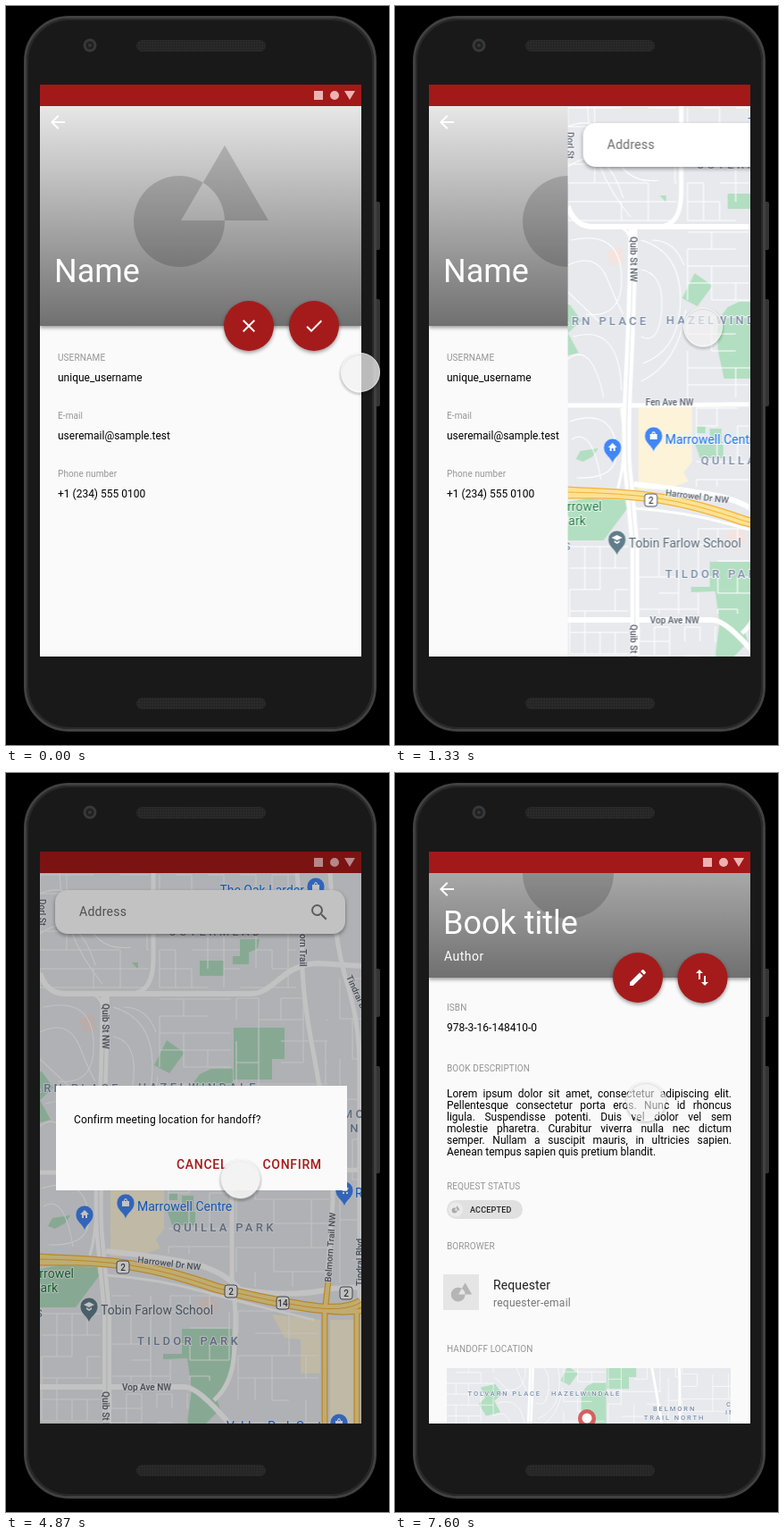
These frames come from a looping animation (429x827 px, 8 s). An HTML page:

```html
<!DOCTYPE html>
<html lang="en">
<head>
<meta charset="utf-8">
<title>Handoff prototype</title>
<style>
html, body { margin: 0; width: 100%; height: 100%; overflow: hidden; background: #000; }
svg { display: block; width: 100%; height: 100%; font: 12px Roboto, sans-serif; }
.label { font-size: 10px; letter-spacing: .1px; fill: #959595; }
.title { font-size: 36px; fill: #fff; }
.lift { filter: drop-shadow(0 2px 2px rgba(0, 0, 0, .4)); }
.action { font-size: 14px; font-weight: 500; letter-spacing: .7px; fill: #a51b1b; }
.district { font-size: 13px; font-weight: 500; letter-spacing: 3.3px; fill: #7b8da8; }
.street { font-size: 10px; font-weight: 500; fill: #5f6672; }
.place { font-size: 14px; }
.district, .street, .place { paint-order: stroke; stroke: #f4f5f7; stroke-width: 2px; stroke-linejoin: round; }
.prose { font: 12px/13px Roboto, sans-serif; color: #000; white-space: nowrap; }
.prose div { text-align-last: justify; white-space: normal; }
</style>
</head>
<body>
<svg viewBox="0 0 429 827" preserveAspectRatio="none">
  <defs>
    <clipPath id="screen"><path d="M38 88h360v640H38z"/></clipPath>
    <clipPath id="card"><path d="M58 795h318v190H58z"/></clipPath>
    <linearGradient id="fade" x2="0" y2="1"><stop stop-color="#e7e7e7"/><stop offset="1" stop-color="#707070"/></linearGradient>
    <radialGradient id="halo">
      <stop offset=".8" stop-opacity="0"/><stop offset=".86" stop-opacity=".24"/><stop offset="1" stop-opacity="0"/>
    </radialGradient>
    <pattern id="mesh" width="3" height="3" patternUnits="userSpaceOnUse">
      <path d="M0 0h3v3H0z" fill="#2a2a2a"/><path d="M0 0h1.5v1.5H0z" fill="#1f1f1f"/>
    </pattern>
    <path id="shapes" fill-rule="evenodd" d="M143 241a51 51 0 1 0 102 0a51 51 0 1 0-102 0zM245 156l49 84h-98z"/>
    <path id="back" fill="#fff" transform="translate(46 118)" d="M20 11H7.83l5.59-5.59L12 4l-8 8 8 8 1.41-1.41L7.83 13H20z"/>
    <g id="bar">
      <path d="M38 88h360v24H38z" fill="#a31919"/>
      <path d="M345 95h10v10h-10zM379 95h12l-6 10zM363 100a5 5 0 1 0 10 0a5 5 0 1 0-10 0z" fill="#edb3b3"/>
    </g>
    <g id="header">
      <path class="lift" d="M38 112h360v246H38z" fill="url(#fade)"/>
      <use href="#shapes" fill-opacity=".17"/>
    </g>
    <circle id="fab" class="lift" r="28" fill="#a51b1b"/>
    <g id="tiles"></g>
  </defs>

  <g id="phone">
    <path d="M412 219h5a2 2 0 0 1 2 2v50a2 2 0 0 1-2 2h-5zM412 328h5a2 2 0 0 1 2 2v116a2 2 0 0 1-2 2h-5z" fill="#343434"/>
    <rect x="21.5" y="12.5" width="392" height="798" rx="49" fill="#191919" stroke="#414141" stroke-width="3"/>
    <rect x="24" y="15" width="387" height="793" rx="47" fill="none" stroke="#292929" stroke-width="2"/>
    <circle cx="94" cy="44" r="7.5" fill="#383838"/>
    <circle cx="94" cy="44" r="4.5" fill="#1f2022"/>
    <circle cx="94" cy="44" r="2" fill="#32383b"/>
    <rect x="146" y="38" width="145" height="13" rx="6.5" fill="url(#mesh)"/>
    <rect x="146" y="774" width="145" height="13" rx="6.5" fill="url(#mesh)"/>
  </g>

  <g clip-path="url(#screen)">
    <g id="profile">
      <path d="M38 88h360v640H38z" fill="#fafafa"/>
      <use href="#header"/><use href="#bar"/><use href="#back"/>
      <text class="title" x="54" y="309">Name</text>
      <use href="#fab" x="272" y="358"/><use href="#fab" x="345" y="358"/>
      <path fill="#fff" transform="translate(260 346)" d="M19 6.41L17.59 5 12 10.59 6.41 5 5 6.41 10.59 12 5 17.59 6.41 19 12 13.41 17.59 19 19 17.59 13.41 12z"/>
      <path fill="#fff" transform="translate(333 346)" d="M9 16.17L4.83 12l-1.42 1.41L9 19 21 7l-1.41-1.41z"/>
      <text class="label" x="58" y="397">USERNAME</text><text x="58" y="420">unique_username</text>
      <text class="label" x="58" y="462">E-mail</text><text x="58" y="485">useremail@sample.test</text>
      <text class="label" x="58" y="527">Phone number</text><text x="58" y="550">+1 (234) 555 0100</text>
    </g>

    <g id="map">
      <g clip-path="url(#screen)">
        <use href="#tiles"/>
        <g id="places"></g>
        <use href="#bar"/>
        <rect class="lift" x="55" y="131" width="325" height="49" rx="14" fill="#fff"/>
        <text x="82" y="160" font-size="14" letter-spacing=".25" fill="#6a6a6a">Address</text>
        <path fill="#7a7a7a" transform="translate(339 144)" d="M15.5 14h-.79l-.28-.27A6.47 6.47 0 0 0 16 9.500 6.500 6.500 0 1 0 9.500 16c1.610 0 3.090-.59 4.230-1.570l.27.28v.79l5 4.990L20.490 19zM9.500 14a4.500 4.500 0 1 1 0-9 4.500 4.500 0 0 1 0 9z"/>
      </g>
    </g>

    <g id="dialog">
      <path d="M38 88h360v640H38z" fill-opacity=".24"/>
      <path d="M56 350h326v117H56z" fill="#fafafa"/>
      <text x="76" y="392" letter-spacing=".16">Confirm meeting location for handoff?</text>
      <text class="action" x="191" y="443">CANCEL</text><text class="action" x="287.500" y="443">CONFIRM</text>
    </g>

    <g id="book">
      <path d="M38 88h360v640H38z" fill="#fafafa"/>
      <g id="page">
        <use href="#header"/>
        <text class="title" x="54" y="309">Book title</text>
        <text x="55" y="339" font-size="14" letter-spacing=".5" fill="#fff">Author</text>
        <use href="#fab" x="272" y="358"/><use href="#fab" x="344.500" y="358.500"/>
        <path fill="#fff" transform="translate(260 346)" d="M3 17.250V21h3.750L17.810 9.940l-3.750-3.750zM20.710 7.040c.39-.39.39-1.020 0-1.410l-2.340-2.340c-.39-.39-1.020-.39-1.410 0l-1.830 1.830 3.750 3.750z"/>
        <path fill="#fff" transform="translate(332 346)" d="M16 17.010V10h-2v7.010h-3L15 21l4-3.990zM9 3L5 6.990h3V14h2V6.990h3z"/>
        <text class="label" x="58" y="395">ISBN</text><text x="58" y="418">978-3-16-148410-0</text>
        <text class="label" x="58" y="463">BOOK DESCRIPTION</text>
        <foreignObject x="58" y="482" width="319" height="84">
          <div class="prose" xmlns="http://www.w3.org/1999/xhtml">
            <div>Lorem ipsum dolor sit amet, consectetur adipiscing elit.</div>
            <div>Pellentesque consectetur porta eros. Nunc id rhoncus</div>
            <div>ligula. Suspendisse potenti. Duis vel dolor vel sem</div>
            <div>molestie pharetra. Curabitur viverra nulla nec dictum</div>
            <div>semper. Nullam a suscipit mauris, in ultricies sapien.</div>
            Aenean tempus sapien quis pretium blandit.
          </div>
        </foreignObject>
        <text class="label" x="58" y="595">REQUEST STATUS</text>
        <rect x="58" y="607" width="85" height="21" rx="10.500" fill="#e0e0e0"/>
        <circle cx="68" cy="617.500" r="8" fill="#ebebeb"/>
        <use href="#shapes" fill="#aaa" transform="translate(55 604) scale(.06)"/>
        <text x="84" y="620.500" font-size="9" font-weight="500" letter-spacing=".2" fill="#222">ACCEPTED</text>
        <text class="label" x="58" y="662">BORROWER</text>
        <path d="M54 690h40v40H54z" fill="#e5e5e5"/>
        <use href="#shapes" fill="#b5b5b5" transform="translate(40.600 675.300) scale(.155)"/>
        <text x="110" y="707" font-size="14" letter-spacing=".1" fill="#212121">Requester</text>
        <text x="110" y="726" letter-spacing=".25" fill="#757575">requester-email</text>
        <text class="label" x="58" y="777">HANDOFF LOCATION</text>
        <g clip-path="url(#card)">
          <use href="#tiles" transform="translate(89.200 619.400) scale(.58)"/>
          <path d="M215 873c-2-8-10-13-10-22a10 10 0 1 1 20 0c0 9-8 14-10 22z" fill="#d65f5f"/>
          <circle cx="215" cy="851" r="5.500" fill="#fff"/>
        </g>
      </g>
      <use href="#bar"/><use href="#back"/>
    </g>
  </g>

  <g id="touch">
    <circle cy="2" r="25" fill="url(#halo)"/>
    <circle r="21.500" fill="#f2f2f2" stroke="#fff" stroke-opacity=".8"/>
  </g>
</svg>

<script>
const $ = id => document.getElementById(id);

// Map geometry
let seed = 7;
const random = () => (seed = seed * 16807 % 2147483647) / 2147483647;

// Street grid with some blocks left out
function grid([x0, y0, x1, y1, dx, dy]) {
  let d = '';
  for (let x = x0; x <= x1; x += dx)
    for (let y = y0; y < y1; y += dy)
      if (random() < .6) d += `M${x} ${y}V${Math.min(y + dy, y1)}`;
  for (let y = y0; y <= y1; y += dy)
    for (let x = x0; x < x1; x += dx)
      if (random() < .72) d += `M${x} ${y}H${Math.min(x + dx, x1)}`;
  return d;
}
const area = (fill, d) => `<path d="${d}" fill="${fill}"/>`;
const line = (color, width, d) => `<path d="${d}" fill="none" stroke="${color}" stroke-width="${width}" stroke-linejoin="round"/>`;
const text = (cls, x, y, words, extra = '') => `<text class="${cls}" x="${x}" y="${y}" ${extra}>${words}</text>`;
const street = (x, y, turn, words) => text('street', 0, 0, words, `transform="translate(${x} ${y}) rotate(${turn})"`);

const blocks = [
  [38, 114, 160, 240, 30, 21], [172, 114, 325, 240, 18, 21], [172, 253, 252, 438, 27, 19],
  [258, 252, 360, 440, 25, 24], [182, 450, 250, 538, 23, 20], [258, 450, 362, 575, 21, 27],
  [118, 585, 250, 680, 22, 18], [40, 605, 106, 725, 17, 24], [118, 695, 204, 728, 17, 16],
  [260, 602, 350, 728, 19, 25], [374, 230, 398, 570, 14, 45]
];
const sides = [[-60, 290, 36, 440, 24, 21], [400, 290, 500, 440, 30, 24]];
const curves = `M38 135Q75 120 88 160T140 195M38 180Q80 150 100 215M60 112Q62 180 108 236
  M42 262Q95 250 98 300T58 345M38 290Q70 275 82 305T100 345M38 320L75 355M44 370Q96 355 98 430M38 395Q65 375 78 438
  M120 262Q165 275 164 330T122 400M120 295Q146 300 143 340T120 370M120 420Q162 400 170 340M132 262Q158 262 168 290
  M40 465Q85 450 92 490T48 528M42 485Q65 470 75 530`;
const highway = 'M38 544Q100 545 140 551T235 576Q290 590 335 597T398 592';
const ramp = 'M38 541L118 548M38 548H112M335 596Q360 606 398 602M357 728V605L361 568M393 602V728';

$('tiles').innerHTML =
  area('#e7e9ed', 'M-80 88H520V760H-80z') +
  area('#fcf3d9', 'M117 448H177V510L168 522 173 532 148 541H117zM298 606L352 612V672H330V634L312 632zM363 612H390V728H363z') +
  area('#f5e3df', 'M82 275L98 270 101 287 86 291zM216 590L231 585 238 597 226 610 217 605z') +
  area('#b2dfc1', `M255 285H312V320H298V343H255zM180 299L200 313 183 336 166 327zM217 337L230 331H254V417H213L206 385V352z
    M217 210H244V227H217zM262 186H284L282 196 272 201V214H254V205H262zM141 212H148V220zM182 470H192V478H182zM197 473H210V490H197zM180 488H212V506H186z
    M38 555L60 551 102 553 104 563 78 598H38zM47 507L52 498 72 495 66 504 55 510z
    M197 622H253V672L236 700 240 712 224 728H203L208 690 203 655 176 656V650H197zM12 340L40 334 53 352 38 366 50 388 22 395 8 372 20 360z`) +
  line('#fff', 1.1, blocks.concat(sides).map(grid).join('') + curves) +
  line('#fff', 5, `M-80 447H115L520 443M165 112V205Q166 246 140 247M253 444V575Q260 600 255 655 252 685 233 702
    M326 112Q332 180 332 213T342 300 366 440V480L358 590M363 112Q368 190 382 235T396 330V600`) +
  line('#fff', 6, `M38 224Q45 246 65 247H275C300 247 310 213 350 213L398 216
    M38 687H200Q215 687 250 728M112 535Q160 540 200 547T262 578Q320 588 365 577L398 575`) +
  line('#fff', 3, 'M112 562Q170 566 220 580T345 612M94 540Q105 500 98 450M95 247Q108 250 110 270') +
  line('#fff', 10, 'M111 245Q110 330 106 410T105 520Q110 570 113 605V728') +
  line('#e3e5e9', 1, 'M111 258Q110 330 106 410T105 520Q110 570 113 605V728') +
  line('#f3b237', 11.5, highway) + line('#f3b237', 7, ramp) +
  line('#fde293', 9, highway) + line('#fde293', 4.5, ramp) + line('#f3b237', 1, highway) +
  text('district', 129, 357, 'TOLVARN PLACE', 'text-anchor="end"') +
  text('district', 148, 356, 'HAZELWINDALE') + text('district', 182, 182, 'OSTERMEAD') +
  text('district', 187, 513, 'QUILLA PARK') + text('district', 147, 640, 'TILDOR PARK') +
  text('district', 386, 386, 'BELMORN', 'text-anchor="middle"') +
  text('district', 386, 402, 'TRAIL NORTH', 'text-anchor="middle"') +
  text('district', 486, 377, 'CORIN') + text('district', 484, 393, 'INDUSTRY') +
  text('district', 33, 609, 'S');

// Pins, shields and street names
const icons = {
  home: 'M-5 0L0-5 5 0H3V4H1V1H-1V4H-3V0z',
  bag: 'M-4-2H-2V-3Q0-7 2-3V-2H4V4H-4zM-1-2H1V-3Q0-4-1-3z',
  cart: 'M-5-4H-3L-2-3H5L3 1H-2L-4-3H-5zM-2 2H0V4H-2zM2 2H4V4H2z',
  school: 'M0-5L6-2 0 1-6-2zM-3 1L0 3 3 1V3L0 5-3 3z'
};
const pin = (x, y, icon, fill = '#4285f4') => `<g transform="translate(${x} ${y})">
  <path d="M0 19C-1 11-10 9-10 0A10 10 0 0 1 10 0C10 9 1 11 0 19z" fill="${fill}" stroke="#fff" stroke-width=".6"/>
  <path d="${icons[icon]}" fill="#fff" fill-rule="evenodd"/></g>`;
const shield = (x, y, number) => `<rect x="${x - 7}" y="${y - 7}" width="14" height="14" rx="3" fill="#fff" stroke="#555b63"/>
  <text x="${x}" y="${y + 3.5}" text-anchor="middle" font-size="10" font-weight="500" fill="#444">${number}</text>`;
const blue = 'fill="#1a73e8"';

$('places').innerHTML =
  street(125, 447, 0, 'Fen Ave NW') + street(307, 448, 0, 'Fen Ave NW') + street(130, 691, 0, 'Vop Ave NW') +
  street(108, 258, 90, 'Quib St NW') + street(108, 692, 90, 'Quib St NW') + street(37, 141, 90, 'Dorl St') +
  street(329, 157, 90, 'Belmorn Trail') + street(364, 570, -86, 'Belmorn Trail NW') +
  street(381, 228, 66, 'Tindral Blvd') + street(400, 574, -90, 'Tindral Blvd') + street(147, 548, 7, 'Harrowel Dr NW') +
  [[131, 553, 2], [252, 580, 2], [310, 593, 14], [381, 582, 2]].map(s => shield(...s)).join('') +
  text('place', 76, 565, 'Harrowel', 'fill="#188038" text-anchor="end"') +
  text('place', 58, 581, 'Park', 'fill="#188038" text-anchor="end"') +
  text('place', 334, 136, 'The Oak Larder', blue + ' text-anchor="end"') +
  text('place', 147, 490, 'Marrowell Centre', blue) + text('place', 391, 475, 'Rundle', blue) +
  text('place', 247, 736, 'Velden Park Cent', blue) +
  text('place', 106, 606, 'Tobin Farlow School', 'fill="#5c6b7a"') +
  pin(88, 494, 'home') + pin(134, 481, 'bag') + pin(347, 127, 'bag') + pin(379, 467, 'cart') +
  pin(373, 727, 'bag') + pin(93, 597, 'school', '#607d8b');

// Timeline: rows of [ms, style, easing]; rows without easing hold
const LOOP = 8000, FPS = 15;
const at = (x, y) => `translate(${x}px, ${y}px)`;
function track(id, rows) {
  const last = rows[rows.length - 1];
  const frames = [...rows, [LOOP, last[1]]].map(([ms, style, easing = 'step-end']) =>
    ({ ...style, offset: ms / LOOP, easing }));
  const animation = $(id).animate(frames, { duration: LOOP, fill: 'both' });
  animation.pause();
  return animation;
}
const touch = (ms, x, y, fillOpacity, easing) => [ms, { transform: at(x, y), fillOpacity }, easing];

const tracks = [
  track('touch', [
    touch(0, 397, 410, .75), touch(267, 397, 410, .75, 'ease-in-out'),
    touch(1000, 345, 359, .75), touch(1200, 345, 359, .42), touch(1266, 345, 359, .65),
    touch(4866, 262, 454, .9, 'ease-out'), touch(5200, 333, 446, .9),
    touch(5533, 330, 439, .9), touch(6266, 330, 439, .45), touch(6733, 330, 439, .9),
    touch(7133, 277, 539, .9), touch(7600, 281, 367, .6)
  ]),
  track('map', [[0, { transform: at(360, 0) }], [1202, { transform: at(360, 0) }, 'ease-out'], [1535, { transform: at(0, 0) }]]),
  track('dialog', [[0, { opacity: 0 }], [4866, { opacity: 1 }], [6733, { opacity: 0 }]]),
  track('book', [[0, { opacity: 0 }], [6733, { opacity: 1 }]]),
  track('page', [[0, { transform: at(0, 0) }], [7600, { transform: at(0, -129) }]])
];

const start = performance.now();
function draw() {
  const ms = (performance.now() - start) % LOOP;
  const step = Math.min(Math.floor((ms + 4) * FPS / 1000), LOOP * FPS / 1000 - 1);
  for (const t of tracks) t.currentTime = step * 1000 / FPS + 1;
  requestAnimationFrame(draw);
}
draw();
</script>
</body>
</html>
```
